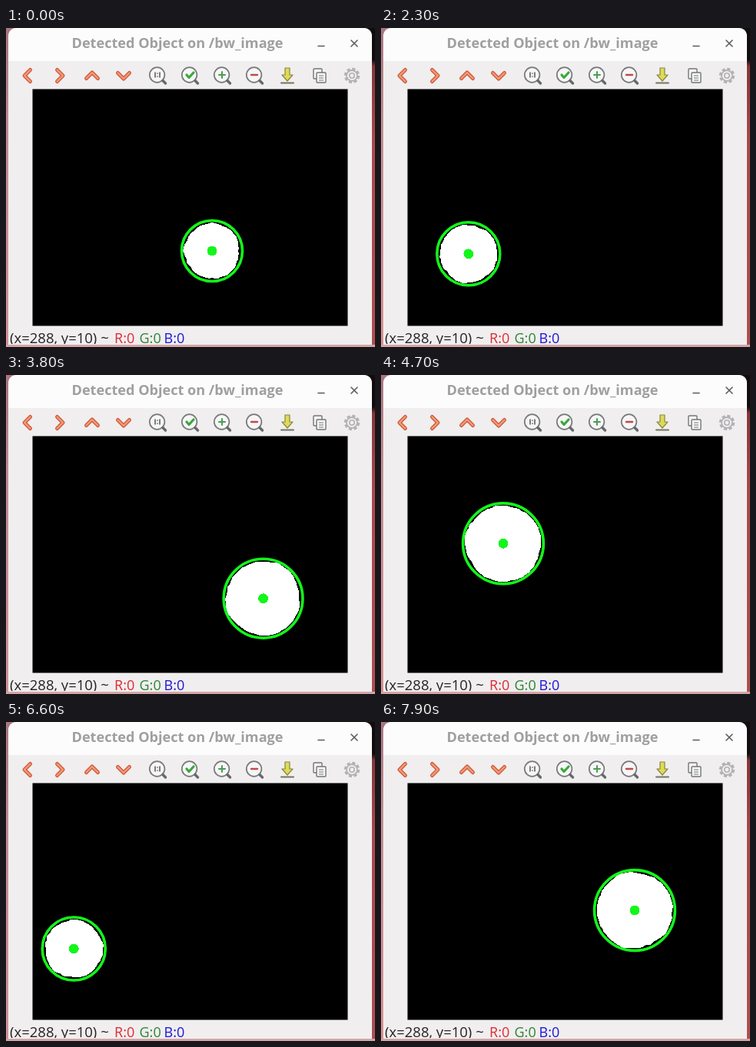
These frames come from a looping animation (480x415 px, 8000 ms). An HTML page:

```html
<!DOCTYPE html>
<html lang="en">
<head>
<meta charset="utf-8">
<title>Detected Object</title>
<style>
  html, body { margin: 0; width: 100%; height: 100%; overflow: hidden; background: #f0eeef; }
  svg { display: block; width: 100vw; height: 100vh; }
  text { font-family: "Open Sans", "Noto Sans", sans-serif; }
  .line { fill: none; stroke-linecap: round; stroke-linejoin: round; }
</style>
</head>
<body>
<svg viewBox="0 0 480 415" preserveAspectRatio="none">
  <defs>
    <linearGradient id="edgeLeft" x2="0" y2="1">
      <stop offset="0" stop-color="#a87580"/>
      <stop offset=".3" stop-color="#c08a92"/>
      <stop offset="1" stop-color="#d58f92"/>
    </linearGradient>
    <linearGradient id="edgeRight" x2="0" y2="1">
      <stop offset="0" stop-color="#120c0e"/>
      <stop offset=".1" stop-color="#120c0e"/>
      <stop offset=".12" stop-color="#84353a"/>
      <stop offset=".35" stop-color="#a8484a"/>
      <stop offset="1" stop-color="#ac4f50"/>
    </linearGradient>
    <clipPath id="statusClip"><rect y="388" width="480" height="23"/></clipPath>
    <clipPath id="viewClip"><rect x="35" y="80" width="409" height="307"/></clipPath>
    <g id="lens">
      <circle cx="-1.4" cy="-1" r="9.8" fill="#f6f6f6" stroke="#77797a" stroke-width="1.7"/>
      <path class="line" d="M6 6.5 L9.5 10" stroke="#66686a" stroke-width="3.4"/>
    </g>
    <g id="chevron" class="line">
      <path d="M3.5 -7.5 L-4 0 L3.5 7.5" stroke="#cf5c3c" stroke-width="5"/>
      <path d="M3.5 -7.5 L-4 0 L3.5 7.5" stroke="#f29a78" stroke-width="2.4"/>
    </g>
  </defs>

  <rect width="240" height="415" fill="url(#edgeLeft)"/>
  <rect x="240" width="240" height="415" fill="url(#edgeRight)"/>
  <rect y="412" width="480" height="3" fill="#d3a5a5"/>
  <path d="M3 412 V12 Q3 0 15 0 H464 Q476 0 476 12 V412 Z" fill="#f0eeef"/>
  <path d="M3 43 V12 Q3 0 15 0 H464 Q476 0 476 12 V43 Z" fill="#fdfcfc"/>

  <text x="223" y="25.5" text-anchor="middle" font-size="18.1" font-weight="700" fill="#a09ea0">Detected Object on /bw_image</text>
  <g class="line" stroke="#5c5a5c" stroke-width="1.6">
    <path d="M406 23.5 H414"/>
    <path d="M449 16 L457 24 M457 16 L449 24"/>
  </g>

  <use href="#chevron" transform="translate(28 62)"/>
  <use href="#chevron" transform="translate(70 62) rotate(180)"/>
  <use href="#chevron" transform="translate(112 62) rotate(90)"/>
  <use href="#chevron" transform="translate(153 62) rotate(-90)"/>

  <g transform="translate(198 62)">
    <use href="#lens"/>
    <path class="line" d="M-4 -4 V2 M2 -4 V2 M-1 -3 V-2.8 M-1 1 V1.2" stroke="#555" stroke-width="1.5"/>
  </g>
  <g transform="translate(240 62)">
    <use href="#lens"/>
    <path class="line" d="M-5 -1 L-2 2.5 L4 -4" stroke="#3aa83a" stroke-width="3.2"/>
  </g>
  <g transform="translate(282 62)">
    <use href="#lens"/>
    <path class="line" d="M-5 -1 H3 M-1 -5 V3" stroke="#4b9c55" stroke-width="2"/>
  </g>
  <g transform="translate(324 62)">
    <use href="#lens"/>
    <path class="line" d="M-5 -1 H3" stroke="#c4484a" stroke-width="2.4"/>
  </g>
  <g class="line" transform="translate(366 62)" stroke="#85893f" stroke-width="1.2">
    <path d="M-3 -10 H3 V-1 H7 L0 7 L-7 -1 H-3 Z" fill="#dfda58"/>
    <path d="M-8 9.5 H8" stroke="#737561" stroke-width="2"/>
  </g>
  <g transform="translate(408 62)" fill="#f6f6f6" stroke="#747678" stroke-width="1.4">
    <rect x="-8" y="-9" width="11" height="13" rx="1"/>
    <rect x="-4" y="-4" width="12" height="13" rx="1"/>
    <path d="M-1 0 H5 M-1 3 H5 M-1 6 H5" stroke-width="1"/>
  </g>
  <g transform="translate(450 62)" fill="none" stroke="#b2b2b4">
    <circle r="8.7" stroke-width="3" stroke-dasharray="4.1 2.73"/>
    <circle r="7" stroke-width="1.8"/>
    <circle r="3.2" stroke-width="1.6"/>
  </g>

  <rect x="34.5" y="79.5" width="410" height="308"/>
  <g clip-path="url(#viewClip)">
    <polygon id="blob" fill="#fff" shape-rendering="crispEdges"/>
    <circle id="ring" fill="none" stroke="#12f61a" stroke-width="3.6"/>
    <circle id="dot" r="6.4" fill="#12f61a" shape-rendering="crispEdges"/>
  </g>

  <g font-size="18" clip-path="url(#statusClip)">
    <text x="5" y="410" font-size="18.5" fill="#242224">(x=288, y=10) ~</text>
    <text x="141" y="410" fill="#dc2c30">R:0</text>
    <text x="173.5" y="410" fill="#2c8634">G:0</text>
    <text x="205.5" y="410" fill="#1c18d4">B:0</text>
  </g>
</svg>
<script>
const LOOP = 8000, STEP = 100, POINTS = 60;

// Turning points [time, value]; each swing between two of them is a half cosine
const swingX = [[0, 268], [1900, 74], [3600, 379], [4300, 143], [5600, 217], [6800, 79], [7900, 330]];
const swingY = [[0, 290], [1300, 297], [3000, 292], [4350, 290], [5100, 132], [6000, 277], [6700, 296], [7900, 245]];
const swingR = [[0, 39.5], [1300, 31], [3300, 51], [4700, 52.4], [6600, 41], [7900, 52.4]];

const find = id => document.getElementById(id);
const blob = find('blob'), ring = find('ring'), dot = find('dot');

function setAttrs(el, attrs) {
  for (const name in attrs) el.setAttribute(name, attrs[name]);
}

function swing(keys, t) {
  const next = Math.max(1, keys.findIndex(([time]) => time >= t));
  const [t0, a] = keys[next - 1], [t1, b] = keys[next];
  return a + (b - a) * (1 - Math.cos(Math.PI * (t - t0) / (t1 - t0))) / 2;
}

// Seeded value from -1 to 1
function noise(n) {
  const s = Math.sin(n * 12.9898) * 43758.5453;
  return (s - Math.floor(s)) * 2 - 1;
}

// Ragged disc inside the ring, fuller when it is large
function blobPoints(t, x, y, r) {
  const fill = 0.81 + 0.0025 * r, seed = t / STEP * 7;
  return Array.from({ length: POINTS }, (_, n) => {
    const angle = n / POINTS * 2 * Math.PI;
    const lobes = Math.cos(3 * angle + noise(seed) * 3) + Math.cos(5 * angle + noise(seed + 1) * 3);
    const d = r * (fill + 0.012 * lobes) + noise(n + seed) * 0.8;
    return `${Math.round(x + d * Math.cos(angle))},${Math.round(y + d * Math.sin(angle))}`;
  }).join(' ');
}

function draw(time) {
  const t = Math.floor((time % LOOP) / STEP) * STEP;
  const [x, y, r] = [swingX, swingY, swingR].map(keys => swing(keys, t));
  setAttrs(ring, { cx: x, cy: y, r });
  setAttrs(dot, { cx: x, cy: y });
  setAttrs(blob, { points: blobPoints(t, x, y, r) });
}

const start = performance.now();
function tick() {
  draw(performance.now() - start);
  requestAnimationFrame(tick);
}
tick();
</script>
</body>
</html>
```
